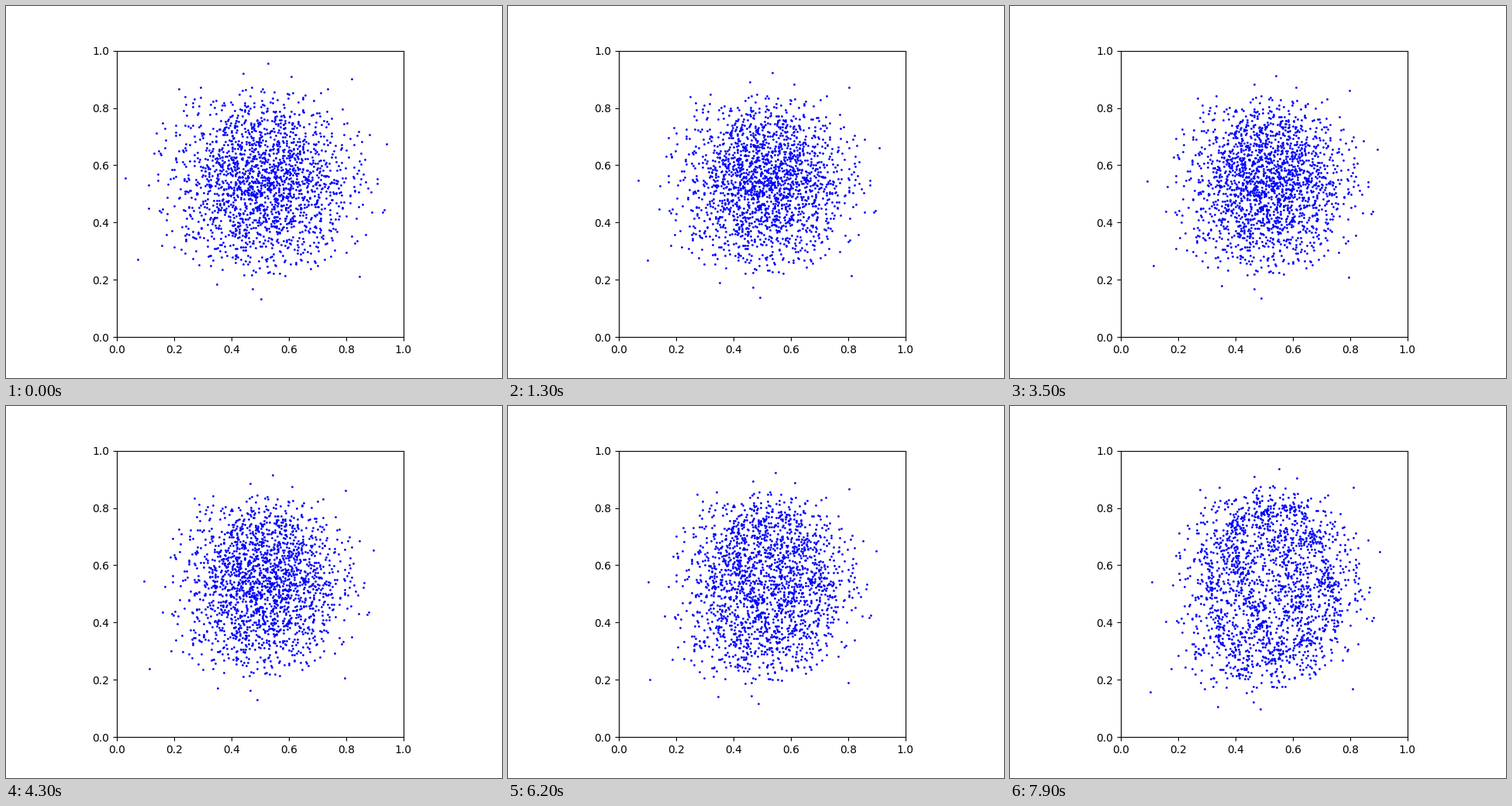
Animation, 640 px wide and 480 px high, one loop 8 s. Source, as a matplotlib script:

```python
import numpy as np
import matplotlib.pyplot as plt
from matplotlib.animation import FuncAnimation

FRAMES = 80
COUNT = 2000
STRAYS = 32
CENTER = np.array([0.51, 0.54])
SPREAD = np.array([0.16, 0.142])

# Outermost dots: left, top, right, bottom, then the corners
RIM = [(0.028, 0.555), (0.527, 0.955), (0.940, 0.675), (0.502, 0.133),
       (0.072, 0.270), (0.847, 0.212), (0.217, 0.865), (0.819, 0.902)]


def make_cloud():
    """Gaussian core with a rounded-square edge, plus a thin ring of strays."""
    rng = np.random.default_rng(12)
    z = rng.normal(size=(COUNT, 2))
    z = z[(np.abs(z) ** 3).sum(axis=1) < 2.3 ** 3]
    angle = rng.uniform(0, 2 * np.pi, STRAYS)
    radius = rng.uniform(2.3, 2.75, STRAYS)
    ring = radius[:, None] * np.column_stack([np.cos(angle), np.sin(angle)])
    return np.vstack([CENTER + np.vstack([z, ring]) * SPREAD, RIM])


def early_pull(dx, dy):
    """Contraction towards the centre, stronger from above than from below."""
    return np.column_stack([
        -0.135 * dx + 0.04 * dy,
        -0.08 * dy - 0.12 * dy ** 2 - 0.05 * dx ** 2,
    ])


def late_drift(dx, dy):
    """Slow spread, with the lower left corner sinking fastest."""
    corner = np.maximum(-dx, 0) * np.maximum(-dy, 0)
    return np.column_stack([
        0.007 + 0.05 * dx ** 2 - 0.3 * corner,
        0.1 * dy - 0.006 - 0.02 * dx - 0.8 * corner,
    ])


def late_push(dx, dy):
    """The middle opens up while the dots gather into faint strands."""
    fall = np.exp(-(dx ** 2 + dy ** 2) / (2 * 0.14 ** 2))
    return np.column_stack([
        0.45 * dx * fall + 0.008 * np.sin(45 * dx + 20 * dy),
        0.75 * dy * fall + 0.008 * np.sin(45 * dy - 20 * dx),
    ])


start = make_cloud()
offset = (start - CENTER).T
pull, drift, push = early_pull(*offset), late_drift(*offset), late_push(*offset)

fig, ax = plt.subplots(figsize=(6.4, 4.8), dpi=100)
ax.set_aspect("equal")
ax.set_xlim(0, 1)
ax.set_ylim(0, 1)
dots, = ax.plot([], [], "bo", markersize=1)


def update(i):
    s = i / (FRAMES - 1)
    pos = start + pull * (1 - np.exp(-i / 14)) + drift * s ** 2 + push * s ** 3
    dots.set_data(pos[:, 0], pos[:, 1])
    return dots,


anim = FuncAnimation(fig, update, frames=FRAMES, interval=100,
                     repeat=True, repeat_delay=0)
plt.show()
```
